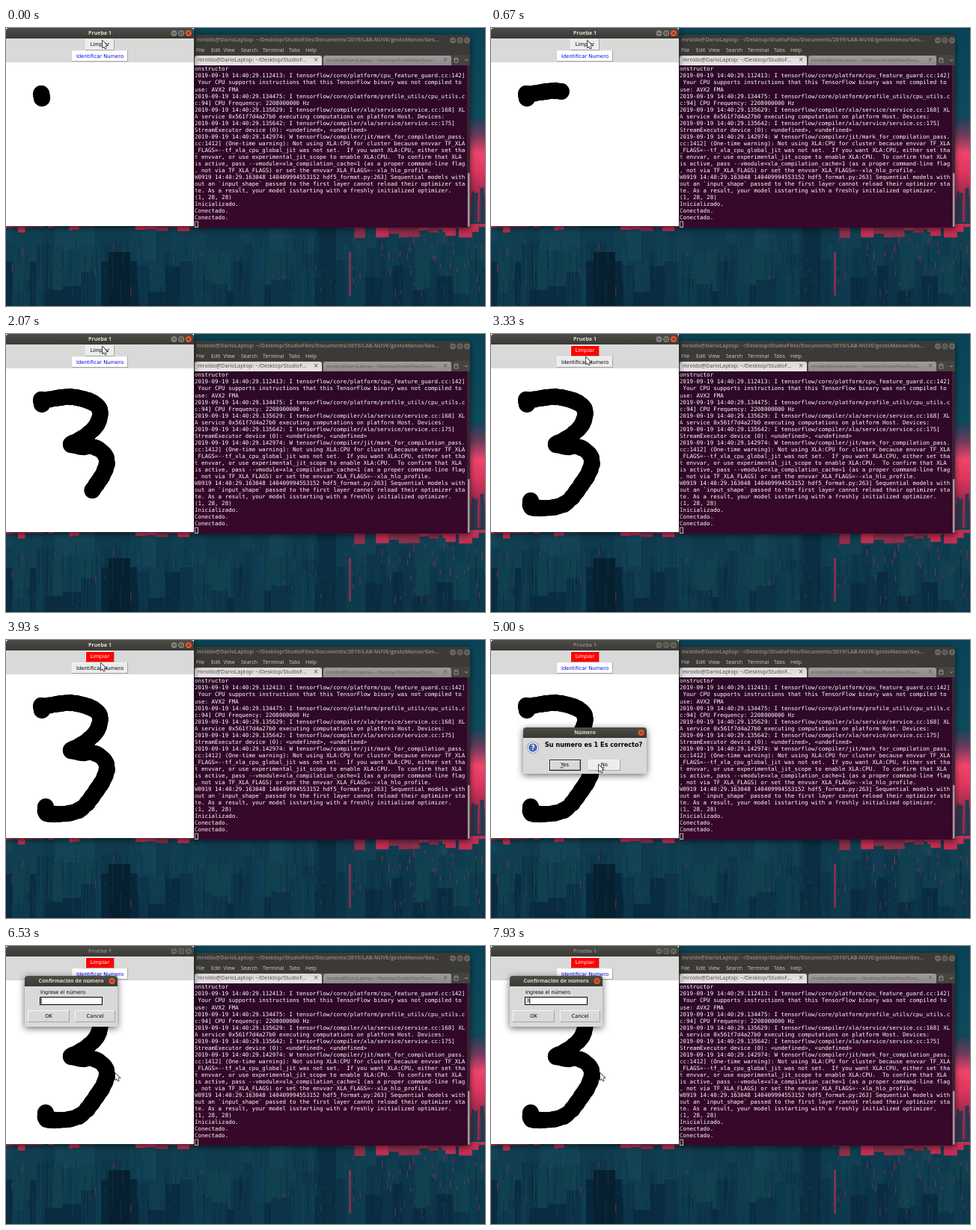
These frames come from a looping animation (640x372 px, 8000 ms). An HTML page with a canvas:

```html
<!DOCTYPE html>
<html lang="es">
<head>
<meta charset="utf-8">
<title>Prueba 1</title>
<style>
html, body { margin: 0; width: 100%; height: 100%; overflow: hidden; background: #0c3547; }
canvas { display: block; width: 640px; height: 372px; }
</style>
</head>
<body>
<canvas id="stage" width="640" height="372"></canvas>
<script>
const W = 640, H = 372, LOOP = 8000, STEP = 200 / 3;
const UI = '"DejaVu Sans", sans-serif';
const TITLE = '"Open Sans", sans-serif';
const MONO = '"DejaVu Sans Mono", monospace';
const stage = document.getElementById('stage').getContext('2d');
let c = stage;

function seeded(seed) {
  return () => (seed = (seed * 16807) % 2147483647) / 2147483647;
}

function box(x, y, w, h, fill) {
  c.fillStyle = fill;
  c.fillRect(x, y, w, h);
}

function rounded(x, y, w, h, radii, fill) {
  c.fillStyle = fill;
  c.beginPath();
  c.roundRect(x, y, w, h, radii);
  c.fill();
}

function disc(x, y, r, fill) {
  c.fillStyle = fill;
  c.beginPath();
  c.arc(x, y, r, 0, 7);
  c.fill();
}

function line(points, color, width = 1) {
  c.strokeStyle = color;
  c.lineWidth = width;
  c.beginPath();
  points.forEach(([x, y]) => c.lineTo(x, y));
  c.stroke();
}

function label(str, x, y, font, color, align = 'left') {
  c.font = font;
  c.fillStyle = color;
  c.textAlign = align;
  c.textBaseline = 'middle';
  c.fillText(str, x, y);
}

function vertical(y0, y1, ...colors) {
  const g = c.createLinearGradient(0, y0, 0, y1);
  colors.forEach((col, i) => g.addColorStop(i / (colors.length - 1), col));
  return g;
}

function withShadow(blur, draw) {
  c.save();
  c.shadowColor = 'rgba(0,0,0,.6)';
  c.shadowBlur = blur;
  c.shadowOffsetY = 2;
  draw();
  c.restore();
}

// ---- wallpaper ----

function skyline(rnd, top, spread, minW, maxW, colors) {
  for (let x = -6; x < W;) {
    const w = minW + rnd() * (maxW - minW);
    const y = top + rnd() * spread;
    box(x, y, w, H - y, colors[Math.floor(rnd() * colors.length)]);
    x += w;
  }
}

function wallpaper() {
  const rnd = seeded(4127);
  box(0, 0, W, H, '#0c4354');
  box(0, 0, W, 120, vertical(0, 120, '#0a4356', '#0c4b5c'));
  box(612, 118, 28, 150, vertical(118, 268, '#0f4659', '#6b3b5c', '#f0446c', '#dd365e', '#a82c50', '#5c3049', '#303950'));
  for (let i = 0; i < 14; i++) box(620 + rnd() * 18, 190 + rnd() * 45, 1 + rnd() * 4, 75, i % 3 ? '#2a384e' : '#b02c4e');

  // hazy city with the red sky between its roofs
  skyline(rnd, 250, 12, 8, 24, ['#113f52', '#0f3b4f', '#134456']);
  for (const [from, to, depth] of [[0, 42, 10], [56, 112, 7], [168, 252, 7], [455, 640, 15]]) {
    for (let x = from; x < to;) {
      const w = 4 + rnd() * 14;
      if (rnd() < .8) box(x, 262, w, 4 + rnd() * depth, rnd() < .6 ? '#c32f53' : '#8f2f4c');
      x += w;
    }
  }
  skyline(rnd, 282, 30, 10, 30, ['#0f3c50', '#0d364a', '#11404f']);
  skyline(rnd, 310, 50, 8, 26, ['#0c3347', '#0e3a4d', '#0a2c40']);
  box(127, 312, 50, 60, '#08263a');
  box(137, 300, 29, 72, '#07202f');
  box(416, 268, 25, 104, '#0b2e42');

  c.globalAlpha = .35;
  for (let i = 0; i < 150; i++) box(rnd() * W, 275 + rnd() * 70, 1, 12 + rnd() * 45, i % 2 ? '#071f30' : '#1b5666');
  for (let i = 0; i < 120; i++) box(rnd() * W, 284 + rnd() * 84, 1, 1 + rnd() * 4, '#2e7480');
  c.globalAlpha = .65;
  for (let i = 0; i < 45; i++) {
    const x = i % 3 ? 455 + rnd() * 185 : rnd() * W;
    box(x, 272 + rnd() * 80, 1, 2 + rnd() * 10, '#b52f52');
  }
  box(458, 300, 3, 58, '#b52f52');
  c.globalAlpha = 1;
}

// ---- terminal ----

const HOST = 'mroldo@DarioLaptop: ~/Desktop/';
const stamp = s => '2019-09-19 14:40:29.' + s;
const LOG = [
  'onstructor',
  stamp('112413: I tensorflow/core/platform/cpu_feature_guard.cc:142]'),
  ' Your CPU supports instructions that this TensorFlow binary was not compiled to',
  'use: AVX2 FMA',
  stamp('134475: I tensorflow/core/platform/profile_utils/cpu_utils.c'),
  'c:94] CPU Frequency: 2208000000 Hz',
  stamp('135629: I tensorflow/compiler/xla/service/service.cc:168] XL'),
  'A service 0x561f7d4a27b0 executing computations on platform Host. Devices:',
  stamp('135642: I tensorflow/compiler/xla/service/service.cc:175]'),
  'StreamExecutor device (0): <undefined>, <undefined>',
  stamp('142974: W tensorflow/compiler/jit/mark_for_compilation_pass.'),
  'cc:1412] (One-time warning): Not using XLA:CPU for cluster because envvar TF_XLA',
  '_FLAGS=--tf_xla_cpu_global_jit was not set.  If you want XLA:CPU, either set tha',
  't envvar, or use experimental_jit_scope to enable XLA:CPU.  To confirm that XLA',
  'is active, pass --vmodule=xla_compilation_cache=1 (as a proper command-line flag',
  ', not via TF_XLA_FLAGS) or set the envvar XLA_FLAGS=--xla_hlo_profile.',
  'W0919 14:40:29.163048 140409994553152 hdf5_format.py:263] Sequential models with',
  'out an `input_shape` passed to the first layer cannot reload their optimizer sta',
  'te. As a result, your model isstarting with a freshly initialized optimizer.',
  '(1, 28, 28)',
  'Inicializado.',
  'Conectado.',
  'Conectado.'
];

function controls(x, y, gap, active) {
  const ink = active ? '#34332f' : '#3b3a36';
  const fill = active ? '#85827a' : '#6a6862';
  disc(x, y, 4, fill);
  disc(x + gap, y, 4, fill);
  line([[x - 2, y], [x + 2, y]], ink);
  c.strokeStyle = ink;
  c.lineWidth = .8;
  c.strokeRect(x + gap - 1.6, y - 1.6, 3.2, 3.2);
  closeButton(x + 2 * gap, y, active);
}

function closeButton(x, y, active) {
  disc(x, y, 4, active ? '#e7582c' : '#6a6862');
  const ink = active ? '#4a2013' : '#3b3a36';
  line([[x - 1.6, y - 1.6], [x + 1.6, y + 1.6]], ink, .9);
  line([[x + 1.6, y - 1.6], [x - 1.6, y + 1.6]], ink, .9);
}

function terminal() {
  withShadow(9, () => rounded(251, 9, 369, 258, [4, 4, 0, 0], '#3b3a36'));
  label(HOST + 'StudioFiles/Documents/2019/LAB-NUVE/gestoManos/Ges...', 254.5, 16.5,
    'bold 7.05px ' + TITLE, '#85827b');
  controls(597, 16.5, 9.5, false);

  const menu = { File: 254, Edit: 274, View: 290.5, Search: 314, Terminal: 343, Tabs: 378, Help: 400 };
  for (const name in menu) label(name, menu[name], 30, '7px ' + TITLE, '#d0ccc3');

  box(251, 36, 369, 14, '#45443f');
  rounded(252, 37, 170, 13, [3, 3, 0, 0], vertical(37, 50, '#dcd7d9', '#eae5e7'));
  rounded(424, 37, 171, 13, [3, 3, 0, 0], vertical(37, 50, '#a09b9c', '#8e898a'));
  label(HOST + 'StudioF...', 256, 43.5, '7.25px ' + TITLE, '#46443f');
  label(HOST + 'StudioFiles/Docu...', 428, 43.5, '6px ' + TITLE, '#5b5856');
  label('×', 414, 43, '8px ' + UI, '#55524c', 'center');
  label('×', 587, 43, '8px ' + UI, '#5b5856', 'center');
  c.strokeStyle = '#a7a399';
  c.lineWidth = .8;
  c.strokeRect(599, 42, 5, 4);
  line([[599.5, 42], [599.5, 40], [603.5, 40], [603.5, 42]], '#a7a399', .8);
  line([[613, 42], [615, 44], [617, 42]], '#a7a399');

  box(251, 50, 369, 217, '#33082a');
  box(251, 50, 369, 217, vertical(50, 267, 'rgba(26,8,34,.25)', 'rgba(70,6,40,.22)'));
  LOG.forEach((row, i) => label(row, 252, 55.5 + i * 9.02, '7.5px ' + MONO, '#fff'));
  c.strokeStyle = '#e9e3e7';
  c.lineWidth = .9;
  c.strokeRect(252.5, 259, 4, 7.5);
  box(616, 50, 4, 217, '#3a2434');
  rounded(617, 194, 2.5, 72, 1, '#a49aa0');
}

// ---- drawing window ----

const PATH = [
  [47, 87], [48, 94], [49, 89], [61, 87], [73, 85], [86, 84], [99, 86], [112, 90], [122, 96],
  [126, 106], [121, 122], [108, 135], [94, 144], [87, 148], [101, 151], [117, 151], [130, 159],
  [135, 171], [130, 187], [121, 201], [114, 211], [107, 220], [97, 228], [83, 232], [68, 233],
  [54, 232], [53, 223]
];
const PEN = [[0, 1], [1130, 9], [2070, 20], [2730, 26]];
const POINTER = [
  [0, 129, 17], [2800, 129, 17], [3150, 127, 31], [4350, 127, 31],
  [4850, 144, 167], [5900, 144, 167], [6150, 146, 170]
];
const ASK = [3950, 5950], ENTRY = 6150, TYPED = 7450;

// Value of the keys [time, ...values] at time t
function track(keys, t, ease = k => k) {
  const i = keys.findIndex(k => k[0] > t);
  if (i < 0) return keys[keys.length - 1].slice(1);
  const [a, b] = [keys[i - 1], keys[i]];
  const k = ease((t - a[0]) / (b[0] - a[0]));
  return a.slice(1).map((v, j) => v + (b[j + 1] - v) * k);
}

function spline(u) {
  const i = Math.min(Math.floor(u), PATH.length - 2), f = u - i;
  const p = k => PATH[Math.max(0, Math.min(PATH.length - 1, i + k))];
  return [0, 1].map(d => {
    const [a, b, e, g] = [p(-1)[d], p(0)[d], p(1)[d], p(2)[d]];
    return b + .5 * f * (e - a + f * (2 * a - 5 * b + 4 * e - g + f * (3 * (b - e) + g - a)));
  });
}

function ink(end) {
  const rnd = seeded(91);
  for (let u = 0; u <= end + .01; u += .2) {
    const [x, y] = spline(u);
    disc(x, y, 10.3 + rnd() * .9, '#000');
  }
}

function bevel(x, y, w, h, fill) {
  box(x, y, w, h, '#a6a6a6');
  box(x, y, w - 1, h - 1, '#f6f6f6');
  box(x + 1, y + 1, w - 2, h - 2, fill);
}

function caption(text, x, y, w, active) {
  rounded(x, y, w, 14, [4, 4, 0, 0], vertical(y, y + 14, '#4e4c47', '#3a3935'));
  label(text, x + w / 2, y + 7, 'bold 7px ' + TITLE, active ? '#dfdbd2' : '#85827b', 'center');
}

function app(t, focused, pointerY) {
  withShadow(9, () => box(0, 0, 251, 265, '#fff'));
  caption('Prueba 1', 0, 0, 251, focused);
  controls(224.5, 7, 9.7, focused);
  box(0, 14, 251, 32, '#d9d9d9');

  const overClear = focused && pointerY < 28;
  bevel(106, 15, 39, 15, overClear ? '#ececec' : '#ff0000');
  label('Limpiar', 125.3, 22.5, '6.75px ' + UI, overClear ? '#000' : '#fff', 'center');
  const overFind = focused && pointerY > 30 && pointerY < 46;
  bevel(88, 30, 75, 15, overFind ? '#ececec' : '#fff');
  label('Identificar Numero', 125.5, 37.8, '6.75px ' + UI, overFind ? '#000' : '#0000f0', 'center');

  c.save();
  c.beginPath();
  c.rect(0, 46, 251, 219);
  c.clip();
  ink(track(PEN, t)[0]);
  c.restore();
}

// ---- dialogs ----

function dialog(text, x, y, w, h) {
  withShadow(10, () => rounded(x, y, w, h, [4, 4, 0, 0], '#d9d9d9'));
  caption(text, x, y, w, true);
  closeButton(x + w - 7.5, y + 7, true);
}

function askDialog(px, py) {
  dialog('Número', 43, 117, 165, 62);
  disc(56, 144, 8, '#8b93a8');
  disc(56, 144, 7.2, '#f4f6fc');
  disc(56, 144, 5.8, '#4668b4');
  label('?', 56, 144.3, 'bold 9px ' + UI, '#fff', 'center');
  label('Su numero es 1 Es correcto?', 72, 140.5, 'bold 8.15px ' + UI, '#000');

  box(78, 160, 42, 15, '#222');
  bevel(79, 161, 40, 13, '#d9d9d9');
  const over = px > 130 && px < 172 && py > 160 && py < 175;
  bevel(130, 160, 43, 15, over ? '#ececec' : '#d9d9d9');
  label('Yes', 98.5, 167.3, '6.75px ' + UI, '#000', 'center');
  label('No', 151.3, 167.3, '6.75px ' + UI, '#000', 'center');
  box(92.5, 170.5, 4, .7, '#000');
  box(146.7, 170.5, 5, .7, '#000');
}

function entryDialog(t) {
  dialog('Confirmación de número', 25, 40, 124, 68);
  label('Ingrese el número', 46, 62.3, '6.6px ' + UI, '#000');
  box(45, 68, 84, 11, '#000');
  box(46, 69, 82, 9, '#fff');
  const typed = t >= TYPED;
  if (typed) label('3', 47, 73.7, '6.75px ' + UI, '#000');
  const since = t - (typed ? TYPED : ENTRY);
  if (since % 900 < 600) box(typed ? 51.3 : 46.6, 69.5, 1, 8, '#000');

  bevel(29, 86, 56, 16, '#d9d9d9');
  bevel(92, 86, 54, 16, '#d9d9d9');
  label('OK', 57, 94.3, '6.75px ' + UI, '#000', 'center');
  label('Cancel', 119, 94.3, '6.75px ' + UI, '#000', 'center');
}

function arrow(x, y) {
  c.beginPath();
  [[0, 0], [0, 9], [2, 7.2], [3.4, 10.4], [4.8, 9.8], [3.5, 6.7], [6.2, 6.5]]
    .forEach(([dx, dy]) => c.lineTo(x + dx, y + dy));
  c.closePath();
  c.lineWidth = 1.3;
  c.strokeStyle = '#000';
  c.stroke();
  c.fillStyle = '#fff';
  c.fill();
}

// ---- playback ----

const still = document.createElement('canvas');
still.width = W;
still.height = H;
c = still.getContext('2d');
wallpaper();
terminal();
c = stage;

const smooth = k => k * k * (3 - 2 * k);

function render(now) {
  // times are rounded to 10 ms, so a step may begin slightly early
  const t = Math.floor((now % LOOP + 5) / STEP) * STEP;
  const [px, py] = track(POINTER, t, smooth);
  const asking = t >= ASK[0] && t < ASK[1];
  const entering = t >= ENTRY;
  c.drawImage(still, 0, 0);
  app(t, !asking && !entering, py);
  if (asking) askDialog(px, py);
  if (entering) entryDialog(t);
  arrow(px, py);
}

const start = performance.now();
function tick() {
  render(performance.now() - start);
  requestAnimationFrame(tick);
}
tick();
</script>
</body>
</html>
```
